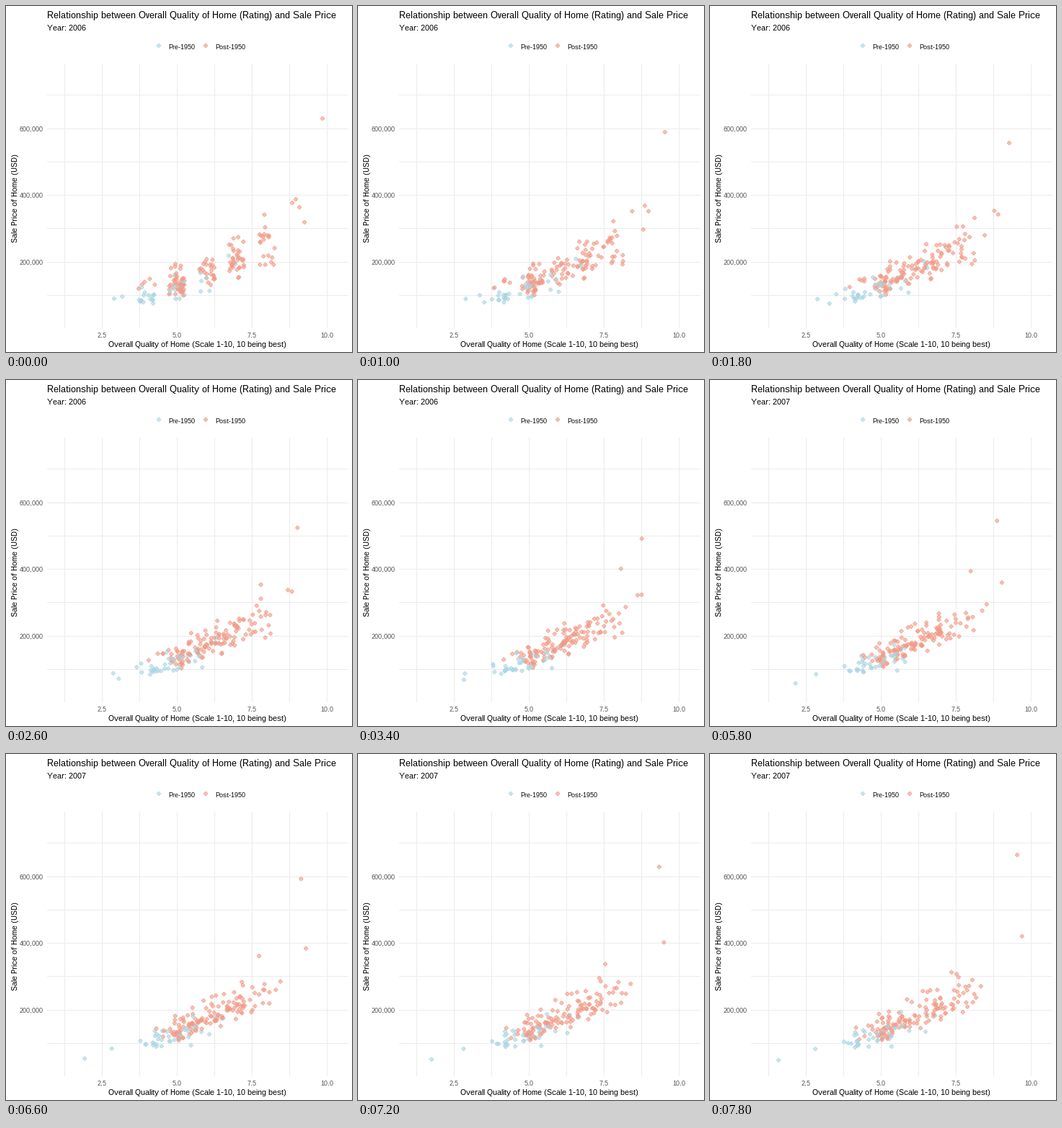
Animation, 480 px wide and 480 px high, one loop 8 s. Source, as a matplotlib script:

```python
import numpy as np
import matplotlib.pyplot as plt
from matplotlib.animation import FuncAnimation
from matplotlib.colors import to_rgba

SIZE, FRAMES, STEP = 480, 40, 200
YEAR_CHANGE = 24            # step at which the subtitle moves on
YEAR_STEPS = 48.5           # steps from one year's data to the next
BLUE, SALMON = "#a9d5e3", "#f29a86"
GREY = "#4d4d4d"

plt.rcParams.update({"font.family": "Liberation Sans",
                     "text.hinting": "native", "text.hinting_factor": 1})

# Homes far from the crowd: rating and price (thousands), first and last step.
POST_KEY = [(9.86, 628, 7.36, 311), (6.93, 196, 9.55, 663),
            (7.09, 181, 9.71, 419), (8.97, 386, 8.18, 235),
            (9.09, 362, 8.34, 269), (8.85, 375, 5.72, 179),
            (9.26, 317, 5.82, 148)]
PRE_KEY = [(3.80, 81, 1.59, 47), (2.91, 88, 2.82, 81), (3.18, 94, 4.64, 125)]

rng = np.random.default_rng(12)


def x_pos(rating):
    return 236.9 + (rating - 5) * 41.6


def y_pos(price):
    return 446.6 - price * 0.4625


def year_points(ratings, drop):
    """Jittered ratings, with prices that climb faster the better the home."""
    n, step = len(ratings), ratings - 4
    mean = 116 + 12.5 * step + 6 * step ** 2 - drop
    noise = np.clip(rng.normal(size=n), -1.9, 2.2)
    return np.column_stack([ratings + rng.uniform(-0.27, 0.27, n),
                            mean * np.exp(0.17 * noise)])


def crowd(n, shares, drop=0):
    """Homes around ratings 4 to 8, paired at random between the years."""
    ratings = rng.choice(np.arange(4, 9), n, p=shares)
    first = year_points(ratings, drop)
    second = year_points(rng.permutation(ratings), drop)
    last = first + (second - first) * (FRAMES - 1) / YEAR_STEPS
    return np.hstack([first, last])


post = np.vstack([POST_KEY, crowd(128, [0.05, 0.36, 0.27, 0.21, 0.11])])
pre = np.vstack([PRE_KEY, crowd(37, [0.25, 0.43, 0.24, 0.08, 0], drop=20)])
homes = np.vstack([post, pre])
colors = np.array([SALMON] * len(post) + [BLUE] * len(pre))
order = rng.permutation(len(homes))
homes, colors = homes[order], colors[order]

fig = plt.figure(figsize=(SIZE / 72, SIZE / 72), dpi=72, facecolor="white")
ax = fig.add_axes([0, 0, 1, 1])
ax.set_xlim(0, SIZE)
ax.set_ylim(SIZE, 0)
ax.axis("off")


def label(x, y, text, size, color="black", **kw):
    return ax.text(x, y, text, fontsize=size, color=color, **kw)


def dots(x, y, hues):
    diamond = [(3, 0.5), (0.5, 3), (-0.5, 3), (-3, 0.5), (-3, -0.5),
               (-0.5, -3), (0.5, -3), (3, -0.5), (3, 0.5)]
    return ax.scatter(x, y, s=5.2 ** 2, marker=diamond, linewidths=1, zorder=3,
                      facecolors=[to_rgba(h, 0.6) for h in hues],
                      edgecolors=[to_rgba(h, 0.7) for h in hues])


grid = dict(color="#ebebeb", lw=1, antialiased=False, zorder=1,
            solid_capstyle="butt")
for rating in np.arange(1.25, 10.1, 1.25):
    x = int(x_pos(rating)) + 0.5
    ax.plot([x, x], [80, 446], **grid)
for price in range(100, 701, 100):
    y = int(y_pos(price)) + 0.5
    ax.plot([57, 474], [y, y], **grid)

for rating in (2.5, 5, 7.5, 10):
    label(x_pos(rating), 460, f"{rating:.1f}", 9, GREY, ha="center")
for price in (200, 400, 600):
    label(52, y_pos(price) + 4.5, f"{price},000", 9, GREY, ha="right")

label(57, 17, "Relationship between Overall Quality of Home (Rating) "
      "and Sale Price", 13)
subtitle = label(57, 34, "", 11)
label(265, 473, "Overall Quality of Home (Scale 1-10, 10 being best)", 11,
      ha="center")
label(18, 267, "Sale Price of Home (USD)", 11, rotation=90,
      ha="right", va="center")

dots([212, 277], [55, 55], [BLUE, SALMON])
label(225.5, 60, "Pre-1950", 9)
label(290.5, 60, "Post-1950", 9)

points = dots(x_pos(homes[:, 0]), y_pos(homes[:, 1]), colors)


def draw(i):
    now = homes[:, :2] + (homes[:, 2:] - homes[:, :2]) * i / (FRAMES - 1)
    points.set_offsets(np.column_stack([x_pos(now[:, 0]), y_pos(now[:, 1])]))
    subtitle.set_text(f"Year: {2006 if i < YEAR_CHANGE else 2007}")
    return points, subtitle


anim = FuncAnimation(fig, draw, frames=FRAMES, interval=STEP,
                     init_func=lambda: draw(0), repeat=True, repeat_delay=0)
plt.show()
```
